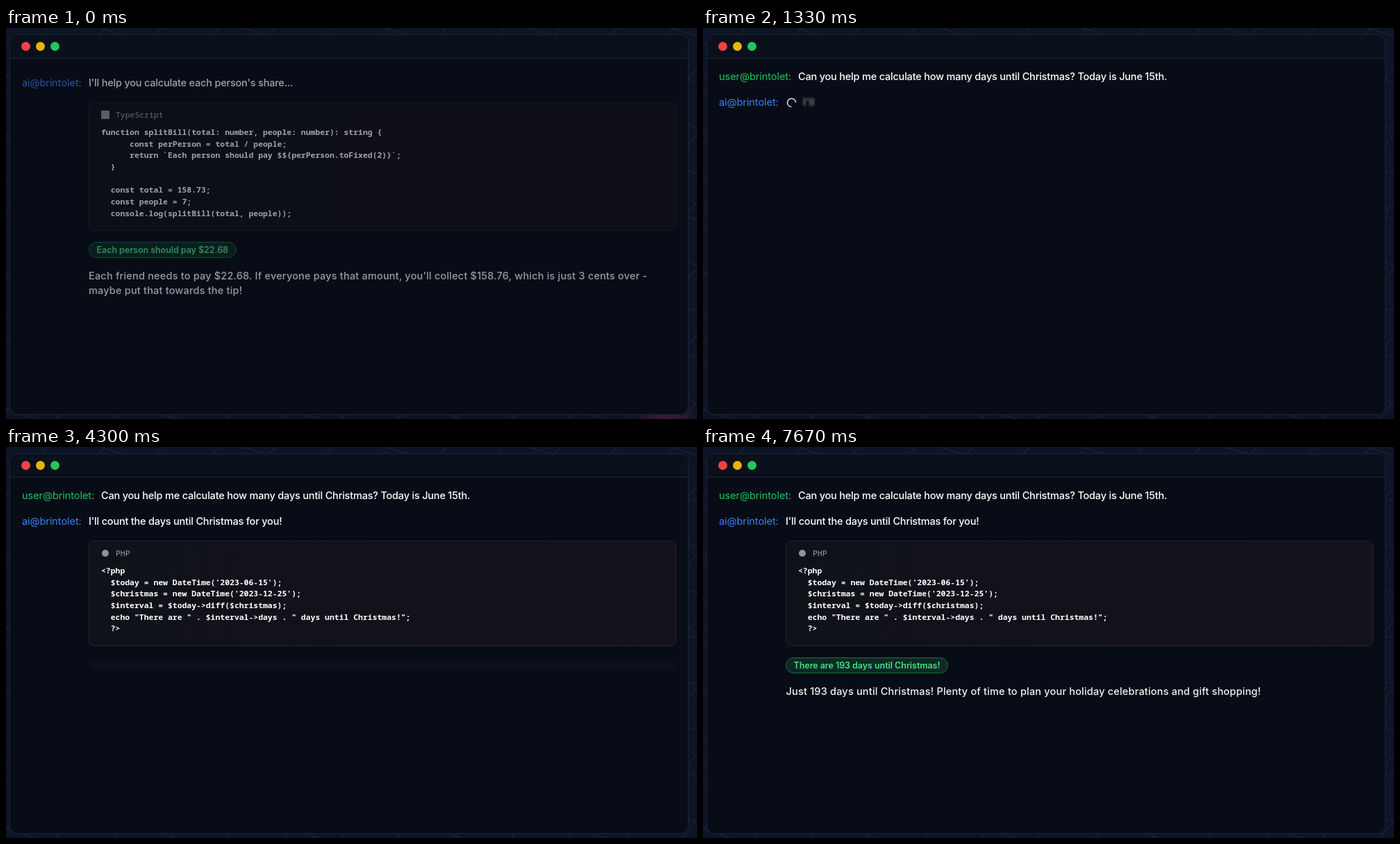
Recreate the animation shown at these times as an HTML page. Size 995 by 563 pixels, loop 8000 ms.

```html
<!DOCTYPE html>
<html lang="en">
<head>
<meta charset="utf-8">
<style>
  html, body { margin: 0; width: 995px; height: 563px; overflow: hidden; background: #0d1425; }
  div, svg, span { box-sizing: border-box; }
  #stage { position: relative; width: 995px; height: 563px; overflow: hidden; font: 500 14.5px/20px Inter, sans-serif; color: #fff; }
  #stage div, #stage svg { position: absolute; white-space: pre; }
  #lines { left: 0; top: 0; stroke: #1a2435; stroke-width: 1.3; }
  #glow { left: 905px; top: 530px; width: 90px; height: 66px; background: radial-gradient(closest-side, #3d1b33, #2f182dcc 60%, #2f182d00); }
  #window { left: 5px; top: 9px; width: 978px; height: 548px; border: 1px solid #1c2636; border-radius: 12px; background: #080c16; overflow: hidden; }
  #bar { left: 0; top: 0; width: 100%; height: 34px; background: #0a111c; border-bottom: 1px solid #1c2636; }
  .dot { width: 13px; height: 13px; border-radius: 50%; top: 20px; }
  .layer { left: 0; top: 0; width: 995px; height: 563px; }
  .label { left: 23px; font-weight: 400; letter-spacing: -.05px; }
  .user { color: #22c55e; }
  .ai { color: #3b82f6; }
  .say { letter-spacing: -.2px; }
  .wide { letter-spacing: .19px; color: #f3f4f6; }
  .wide span { display: inline-block; white-space: pre; }
  .box { left: 119px; width: 846px; border: 1px solid #22252d; border-radius: 8px; background: linear-gradient(100deg, #101219, #14121a); }
  .mono { font: 600 11.43px/16.65px "Noto Sans Mono", monospace; }
  .lang { left: 38px; top: 9px; color: #9ca3af; font-weight: 400; }
  .code { left: 17px; top: 34px; }
  .icon { background: #8b93a1; }
  .badge { left: 119px; height: 23px; padding: 0 10.5px; border: 1px solid #17713f; border-radius: 12px; background: #0d2a25; color: #4ade80; font: 600 12.5px/21px Inter, sans-serif; letter-spacing: -.05px; }
  #wait { left: 120px; top: 307px; width: 845px; height: 14px; border-radius: 7px; background: #ffffff0d; }
</style>
</head>
<body>
<div id="stage"></div>
<script>
const stage = document.getElementById('stage');
const LOOP = 8000;
const clamp = x => Math.min(1, Math.max(0, x));
const ramp = (t, from, to) => clamp((t - from) / (to - from));
const easeOut = x => 1 - (1 - x) ** 2;
const backOut = x => 1 + 2.7 * (x - 1) ** 3 + 1.7 * (x - 1) ** 2;

function add(parent, cls, style = {}, text = '') {
  const el = document.createElement('div');
  el.className = cls;
  for (const k in style) el.style[k] = typeof style[k] === 'number' ? style[k] + 'px' : style[k];
  el.textContent = text;
  parent.append(el);
  return el;
}
const named = (parent, id) => { const el = add(parent, ''); el.id = id; return el; };
const line = (parent, cls, x, y, text) => add(parent, cls, { left: x, top: y - 10 }, text);

function codeBox(parent, top, height, lang, icon, code) {
  const box = add(parent, 'box', { top, height });
  add(box, 'icon', icon);
  add(box, 'mono lang', {}, lang);
  add(box, 'mono code', {}, code);
  return box;
}

function wordsOf(el, text) {
  return text.split(/(?<= )/).map(word => {
    const span = document.createElement('span');
    span.textContent = word;
    el.append(span);
    return span;
  });
}

function reveal(words, t, startOf) {
  words.forEach((word, i) => {
    const p = ramp(t, startOf(i), startOf(i) + 150);
    word.style.opacity = p;
    word.style.filter = p < 1 ? `blur(${4 * (1 - p)}px)` : 'none';
  });
}

// Backdrop and window
let path = '';
for (let i = -8; i < 18; i++) {
  path += `M0 ${i * 66 + 22}l995 320`;
  path += `M${i * 82 + 60} 0l-480 563`;
}
stage.innerHTML = `<svg id="lines" width="995" height="563"><path d="${path}" fill="none"/></svg>`;
const glow = named(stage, 'glow');
const win = named(stage, 'window');
named(win, 'bar');
['#ef4444', '#eab308', '#22c55e'].forEach((background, i) => add(stage, 'dot', { left: 22 + i * 21, background }));

// Earlier answer, on its way out
const past = add(stage, 'layer');
line(past, 'label ai', 23, 79, 'ai@brintolet:');
line(past, 'say', 119, 79, "I'll help you calculate each person's share...");
codeBox(past, 107, 185, 'TypeScript', { left: 17, top: 11, width: 12, height: 12 },
`function splitBill(total: number, people: number): string {
      const perPerson = total / people;
      return \`Each person should pay $\${perPerson.toFixed(2)}\`;
  }

  const total = 158.73;
  const people = 7;
  console.log(splitBill(total, people));`);
add(past, 'badge', { top: 308 }, 'Each person should pay $22.68');
line(past, 'wide', 119, 357, "Each friend needs to pay $22.68. If everyone pays that amount, you'll collect $158.76, which is just 3 cents over -");
line(past, 'wide', 119, 377.5, 'maybe put that towards the tip!');

// Question
const question = 'Can you help me calculate how many days until Christmas? Today is June 15th.';
const ask = add(stage, 'layer');
line(ask, 'label user', 23, 70, 'user@brintolet:');
const typed = line(ask, 'say', 137, 70, '');

// Answer
const answer = "I'll count the days until Christmas for you!";
const reply = add(stage, 'layer');
line(reply, 'label ai', 23, 107, 'ai@brintolet:');
const done = line(reply, 'say', 119, 107, answer);
const stream = line(reply, 'wide', 144, 107, '');
const streamWords = wordsOf(stream, answer);
const spinner = add(reply, '', { left: 120, top: 100, width: 15, height: 15 });
spinner.innerHTML = '<svg width="15" height="15"><path d="M7.5 1.5a6 6 0 1 1-6 6" fill="none" stroke="#d5d9e0" stroke-width="1.6"/></svg>';
const php = codeBox(stage, 135, 152, 'PHP', { left: 18, top: 12, width: 10, height: 10, borderRadius: '50%' },
`<?php
  $today = new DateTime('2023-06-15');
  $christmas = new DateTime('2023-12-25');
  $interval = $today->diff($christmas);
  echo "There are " . $interval->days . " days until Christmas!";
  ?>`);
const wait = named(stage, 'wait');
const badge = add(stage, 'badge', { top: 303 }, 'There are 193 days until Christmas!');
const summary = line(stage, 'wide', 119.5, 352, '');
const summaryWords = wordsOf(summary, 'Just 193 days until Christmas! Plenty of time to plan your holiday celebrations and gift shopping!');

const show = (el, on) => { el.style.visibility = on ? 'visible' : 'hidden'; };

function draw(t) {
  const out = ramp(t, 0, 190);
  past.style.opacity = .62 * (1 - out);
  past.style.transform = `translateY(${-12 * out}px)`;
  glow.style.opacity = 1 - out;

  const replying = t >= 1200;
  ask.style.opacity = ramp(t, 190, 270);
  ask.style.transform = `translateY(${replying ? 0 : 17}px)`;
  typed.textContent = question.slice(0, Math.max(0, Math.floor((t - 266) / 12.2)));

  reply.style.display = replying ? 'block' : 'none';
  const streaming = t < 2200;
  show(done, !streaming);
  show(stream, streaming);
  show(spinner, streaming);
  spinner.style.transform = `rotate(${(t - 1830) * .36}deg)`;
  reveal(streamWords, t, i => 1245 + 95 * i);

  php.style.opacity = easeOut(ramp(t, 2250, 2700));
  wait.style.opacity = t < 4970 ? ramp(t, 4180, 4600) : 0;
  const pop = ramp(t, 4950, 5270);
  badge.style.opacity = clamp(pop * 2);
  badge.style.transform = `scale(${.8 + .2 * backOut(pop)})`;
  reveal(summaryWords, t, i => 6480 + Math.max(20 * i, 103 * i - 520));
}

function tick() {
  draw(performance.now() % LOOP);
  requestAnimationFrame(tick);
}
tick();
</script>
</body>
</html>
```
